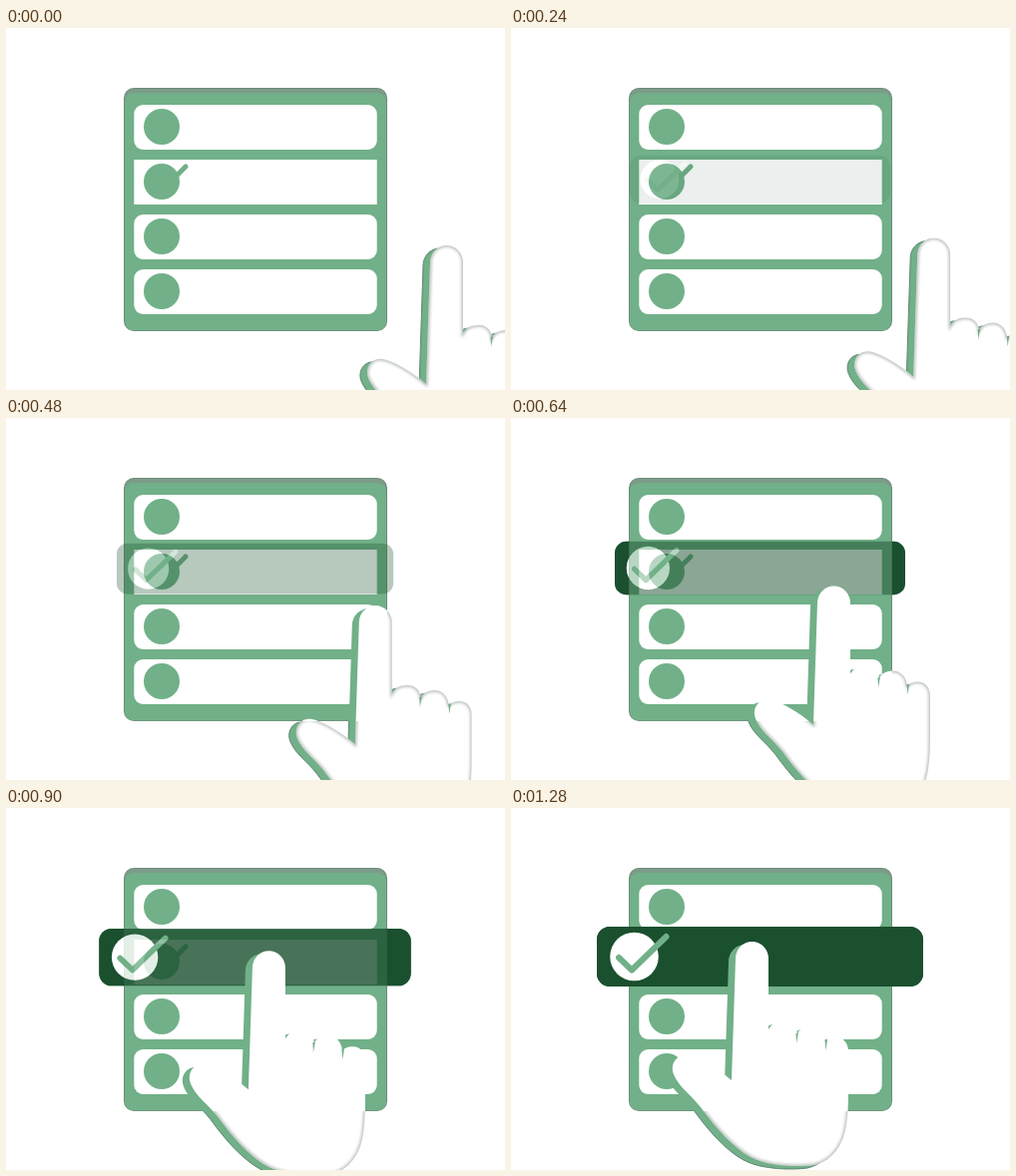
Recreate the animation shown at these times as an HTML page. Size 500x363 px, loop 1.3 s.

```html
<!DOCTYPE html>
<html lang="en">
<head>
<meta charset="utf-8">
<title>Choosing a list entry</title>
<style>
  html, body { margin: 0; width: 100%; height: 100%; overflow: hidden; background: #fff; }
  svg { display: block; width: 500px; height: 363px; }
  .green { fill: #71b088; }
  .tick { fill: none; stroke: #71b088; stroke-linecap: round; stroke-linejoin: round; }
</style>
</head>
<body>
<svg viewBox="0 0 500 363">
  <defs>
    <path id="palm" d="M258 222V151A16.5 17 0 0 0 225 151L221 273C204 259 190 251 178 248
      C166 246 159 257 163 267C168 280 180 287 190 300C206 322 222 340 240 350
      C258 360 290 360 304 358C322 354 333 338 336 318Q338 305 338 290V244
      C338 236 333 230 326 230C320 230 316 232 315 235C315 226 309 219 301 219
      C294 219 289 222 287 226C286 218 280 213 272 214C265 214 261 217 258 222Z"/>
    <g id="card">
      <rect x="86" y="119" width="327" height="60" rx="13" fill="#1a502e"/>
      <circle cx="123.5" cy="149" r="24.3" fill="#fff"/>
      <path class="tick" stroke-width="6" d="M108 150L121 162.5L155.5 129"/>
    </g>
    <clipPath id="inPalm"><use href="#palm"/></clipPath>
    <clipPath id="offPanel">
      <path clip-rule="evenodd" d="M0 0H500V363H0ZM118 60H382V304H118Z"/>
    </clipPath>
    <filter id="soft" x="-10%" y="-10%" width="120%" height="120%">
      <feGaussianBlur stdDeviation="1.5"/>
    </filter>
  </defs>

  <use href="#card" id="cardBack"/>

  <rect x="118" y="60" width="264" height="244" rx="10" fill="#6f8c7b"/>
  <rect x="119" y="61" width="262" height="20" rx="9" fill="#7c9c89"/>
  <rect class="green" x="119" y="65" width="262" height="238.3" rx="9"/>
  <g id="rows"></g>
  <path class="tick" stroke-width="5" d="M166 153L180 139"/>

  <use href="#card" id="cardFront"/>

  <g class="hand">
    <use href="#palm" class="green" x="-7" y="3"/>
  </g>
  <g clip-path="url(#offPanel)">
    <g class="hand">
      <use href="#palm" x="-7" y="3" fill="none" stroke="#5d8570"/>
    </g>
  </g>
  <g class="hand">
    <use href="#palm" fill="#fff"/>
    <path class="green" d="M288 225L286 236L285.5 226ZM317 232L315.5 243L314.5 233Z"/>
  </g>
  <g clip-path="url(#offPanel)">
    <g class="hand">
      <g clip-path="url(#inPalm)">
        <use href="#palm" fill="none" stroke="#7d8b83" stroke-width="3" opacity=".6" filter="url(#soft)"/>
      </g>
    </g>
  </g>
</svg>
<script>
  const LOOP = 1300, STEP = 20;
  const el = id => document.getElementById(id);
  const hands = document.querySelectorAll('.hand');
  const back = el('cardBack'), front = el('cardFront');

  el('rows').innerHTML = [0, 1, 2, 3].map(i => {
    const y = 77 + 55 * i;
    return `<rect x="128.3" y="${y}" width="243.4" height="45" rx="${i === 1 ? 0 : 9}" fill="#fff"/>
      <circle class="green" cx="156" cy="${y + 22}" r="18"/>`;
  }).join('');

  function draw(ms) {
    const u = Math.floor(ms / STEP) * STEP / (LOOP - STEP);
    const e = (1 - Math.cos(Math.PI * u)) / 2;

    // The card grows from the second row.
    const scale = 0.78 + 0.22 * e, cy = 152 - 3 * e;
    const pose = `translate(249.5 ${cy}) scale(${scale}) translate(-249.5 -149)`;
    back.setAttribute('transform', pose);
    front.setAttribute('transform', pose);
    front.setAttribute('opacity', e);
    // Beyond the panel the card switches on at half strength.
    back.setAttribute('visibility', e > 0.499 ? 'visible' : 'hidden');

    // The hand leads the card a little.
    const left = 1 - e - 0.72 * e * e * (1 - e);
    for (const h of hands) h.setAttribute('transform', `translate(${200 * left} ${84 * left})`);
  }

  const start = performance.now();
  function tick(now) {
    draw(Math.max(0, now - start) % LOOP);
    requestAnimationFrame(tick);
  }
  draw(0);
  requestAnimationFrame(tick);
</script>
</body>
</html>
```
